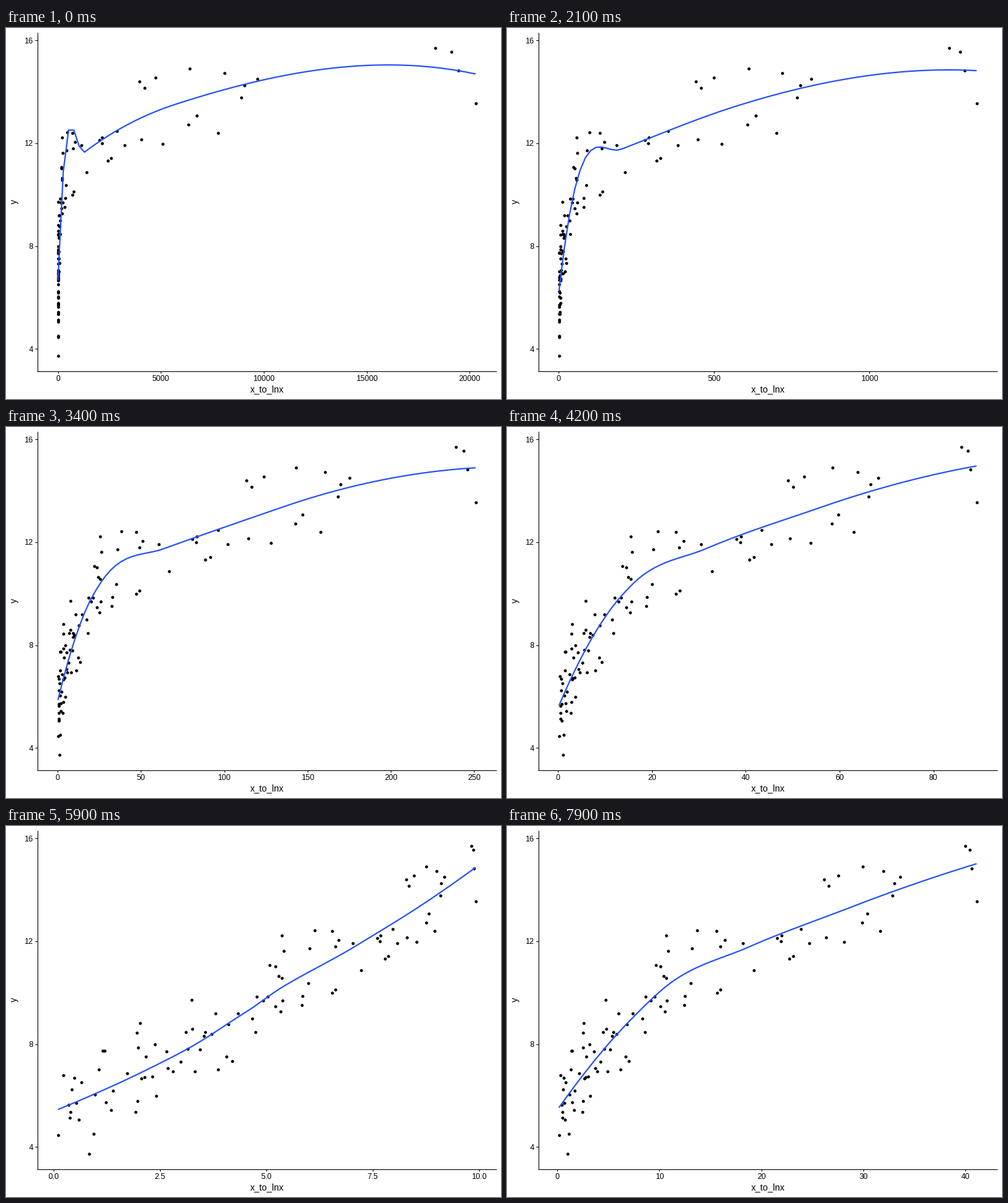
A matplotlib script that plays this animation: 768x576 px, repeating every 8000 ms.

```python
import numpy as np
import matplotlib.pyplot as plt
from matplotlib.animation import FuncAnimation

plt.rcParams["font.family"] = "Liberation Sans"

W, H, DPI = 768, 576, 100
PT = 72 / DPI                      # points per pixel
LEFT, RIGHT, TOP, BOTTOM = 48.5, 761.1, 6.8, 532.5
X_MIN_PX, X_SPAN_PX = 80.6, 648.0
STEPS, HOLD, FRAMES = 59, 10, 80

X = np.array([
    .100, .220, .356, .374, .394, .417, .492, .530, .588, .656,
    .838, .939, .977, 1.068, 1.156, 1.202, 1.220, 1.345, 1.391, 1.727,
    1.927, 1.958, 1.977, 1.980, 2.026, 2.068, 2.133, 2.170, 2.318, 2.376,
    2.409, 2.650, 2.688, 2.803, 2.989, 3.109, 3.152, 3.235, 3.261, 3.318,
    3.442, 3.523, 3.568, 3.709, 3.803, 3.859, 4.061, 4.109, 4.200, 4.336,
    4.667, 4.735, 4.768, 4.924, 5.033, 5.076, 5.209, 5.212, 5.288, 5.338,
    5.364, 5.371, 5.386, 5.414, 5.830, 5.848, 5.980, 6.011, 6.133, 6.541,
    6.550, 6.618, 6.621, 6.702, 7.036, 7.230, 7.609, 7.667, 7.677, 7.792,
    7.856, 7.962, 8.080, 8.284, 8.307, 8.343, 8.464, 8.536, 8.754, 8.762,
    8.816, 8.961, 8.998, 9.094, 9.112, 9.179, 9.817, 9.859, 9.876, 9.918])
Y = np.array([
    4.46, 6.79, 5.63, 5.13, 5.37, 6.24, 6.68, 5.71, 5.06, 6.52,
    3.74, 4.50, 6.04, 7.00, 7.75, 7.74, 5.74, 5.43, 6.19, 6.85,
    5.37, 8.43, 5.79, 7.87, 8.81, 6.66, 6.70, 7.51, 6.74, 8.00,
    5.99, 7.72, 7.06, 6.94, 7.32, 8.47, 7.81, 9.72, 8.60, 6.94,
    7.80, 8.31, 8.46, 8.40, 9.20, 7.01, 7.51, 8.76, 7.34, 9.20,
    9.00, 8.47, 9.84, 9.70, 9.84, 11.08, 9.46, 11.02, 10.64, 9.27,
    10.57, 12.21, 9.69, 11.61, 9.52, 9.87, 10.36, 11.72, 12.43, 12.39,
    10.00, 11.79, 10.12, 12.05, 11.93, 10.86, 12.11, 12.00, 12.22, 11.31,
    11.41, 12.48, 11.93, 14.40, 12.14, 14.14, 14.55, 11.97, 12.73, 14.89,
    13.08, 12.40, 14.72, 13.78, 14.26, 14.49, 15.71, 15.56, 14.83, 13.54])


def y_px(y):
    return 498.3 - 39.94 * (y - 4)


def cut_points(x, cell=15):
    """Median splits until every cell holds at most `cell` points."""
    if len(x) <= cell:
        return []
    m = (len(x) + 1) // 2
    return (cut_points(x[:m], cell) + [(x[m - 1] + x[m]) / 2]
            + cut_points(x[m:], cell))


def local_fit(x, y, at, span=0.75):
    """Value and slope of the tricube-weighted local parabola."""
    d = np.abs(x - at)
    h = np.sort(d)[int(span * len(x)) - 1]
    w = np.sqrt(np.clip(1 - (d / h) ** 3, 0, 1) ** 3)
    u = (x - at) / h
    basis = np.stack([np.ones_like(u), u, u * u], axis=1)
    coef = np.linalg.lstsq(basis * w[:, None], y * w, rcond=None)[0]
    return coef[0], coef[1] / h


def loess(x, y, grid):
    """Local fits at the cell corners, joined by cubic Hermite pieces."""
    pad = 0.005 * (x[-1] - x[0])
    knots = np.array([x[0] - pad] + cut_points(x) + [x[-1] + pad])
    val, slope = np.array([local_fit(x, y, k) for k in knots]).T
    i = np.clip(np.searchsorted(knots, grid) - 1, 0, len(knots) - 2)
    width = knots[i + 1] - knots[i]
    s = (grid - knots[i]) / width
    r = 1 - s
    return (val[i] * r * r * (1 + 2 * s) + val[i + 1] * s * s * (3 - 2 * s)
            + width * s * r * (slope[i] * r - slope[i + 1] * s))


def nice_breaks(lo, hi, m=5):
    """Axis breaks scored on simplicity, coverage and density."""
    best, result = -9, None
    span = hi - lo
    for rank, q in enumerate((1, 5, 2, 2.5, 4, 3)):
        for k in range(2, 12):
            z0 = int(np.ceil(np.log10(span / (k + 1) / q)))
            for z in (z0, z0 + 1):
                step = q * 10.0 ** z
                first = int(np.floor(hi / step)) - (k - 1)
                last = int(np.ceil(lo / step))
                for start in range(first, last + 1):
                    a = start * step
                    b = a + step * (k - 1)
                    simple = (a <= 0 <= b) - rank / 5
                    cover = 1 - 50 * ((hi - b) ** 2 + (lo - a) ** 2) / span ** 2
                    ratio = ((k - 1) / (b - a)
                             * (max(b, hi) - min(a, lo)) / (m - 1))
                    dense = 2 - max(ratio, 1 / ratio)
                    score = .25 * simple + .2 * cover + .5 * dense + .05
                    if score > best:
                        best, result = score, a + step * np.arange(k)
    return result


fig = plt.figure(figsize=(W / DPI, H / DPI), dpi=DPI, facecolor="white")
ax = fig.add_axes([0, 0, 1, 1])
ax.set_xlim(0, W)
ax.set_ylim(H, 0)
ax.axis("off")


def stroke(xs, ys, color="black", width=1.07, **kw):
    return ax.plot(xs, ys, color=color, lw=width * PT, **kw)[0]


def label(x, y, text, size, **kw):
    kw = {"ha": "center", "va": "baseline", **kw}
    return ax.text(x, y, text, fontsize=size * PT, color="black", **kw)


dots = ax.scatter(X, Y, s=(4.7 * PT) ** 2, c="black", linewidths=0, zorder=2)
curve = stroke([], [], "#2450fa", 2.13, zorder=3,
               solid_capstyle="butt", solid_joinstyle="round")

stroke([LEFT, LEFT], [TOP, BOTTOM + 0.5], solid_capstyle="butt")
stroke([LEFT - 0.5, RIGHT], [BOTTOM, BOTTOM], solid_capstyle="butt")
for v in (4, 8, 12, 16):
    stroke([LEFT - 3.8, LEFT], [y_px(v)] * 2, solid_capstyle="butt")
    label(42, y_px(v) + 4.5, str(v), 12, ha="right")
label(404.6, 565, "x_to_lnx", 14)
label(19.5, 269.6, "y", 14, rotation=90, ha="right", va="center")

ticks = [stroke([], [], solid_capstyle="butt") for _ in range(12)]
names = [label(0, 548, "", 12) for _ in range(12)]


def update(n):
    step = min(n, STEPS) if n < STEPS + HOLD else 2 * STEPS + HOLD - 1 - n
    t = step / STEPS
    # geometric blend from exp(x) to x
    x = np.exp((1 - t) * X) * X ** t
    lo, hi = x[0], x[-1]

    def x_px(v):
        return X_MIN_PX + (v - lo) / (hi - lo) * X_SPAN_PX

    dots.set_offsets(np.column_stack([x_px(x), y_px(Y)]))
    grid = np.linspace(lo, hi, 80)
    curve.set_data(x_px(grid), y_px(loess(x, Y, grid)))

    breaks = nice_breaks(lo, hi)
    digits = 0 if np.allclose(breaks, np.round(breaks)) else 1
    shown = [b for b in breaks if LEFT <= x_px(b) <= RIGHT]
    for i, (tick, name) in enumerate(zip(ticks, names)):
        on = i < len(shown)
        tick.set_visible(on)
        name.set_visible(on)
        if on:
            p = x_px(shown[i])
            tick.set_data([p, p], [BOTTOM, BOTTOM + 3.8])
            name.set_x(p)
            name.set_text(f"{shown[i]:.{digits}f}")
    return [dots, curve, *ticks, *names]


anim = FuncAnimation(fig, update, frames=FRAMES, interval=100,
                     init_func=lambda: update(0), repeat=True,
                     repeat_delay=0, blit=False)
plt.show()
```
